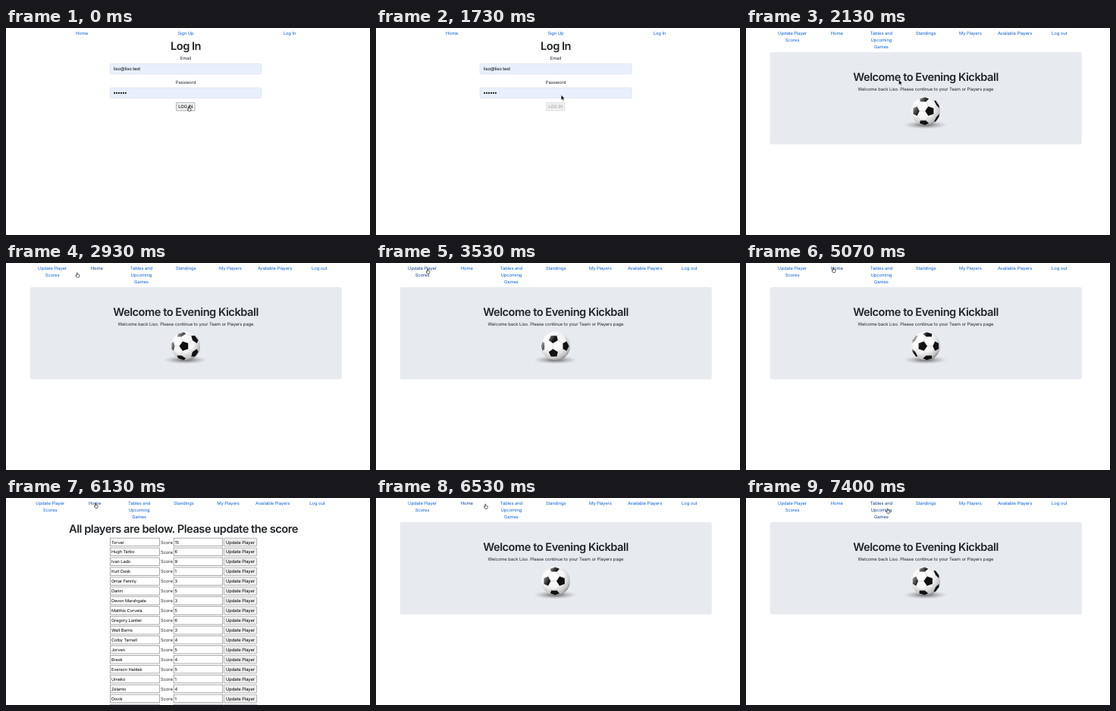
Recreate the animation shown at these times as an HTML page. Size 480 by 274 pixels, loop 7.47 s.

```html
<!DOCTYPE html>
<html lang="en">
<head>
<meta charset="utf-8">
<title>Log in and update scores</title>
<style>
  html, body { margin: 0; height: 100%; overflow: hidden; background: #fff; }
  svg { display: block; width: 100vw; height: 100vh; }
  text {
    font: 5.86px Inter, "Open Sans", sans-serif; letter-spacing: -.014em;
    fill: #212529; text-rendering: geometricPrecision;
  }
  .mid { text-anchor: middle; }
  .title { font-size: 14.65px; font-weight: 600; letter-spacing: -.032em; }
  .link { fill: #0b62da; }
  .link.hover { fill: #123f8c; }
  .value { font-size: 5.65px; fill: #000; }
  .field { fill: #e8f0fe; stroke: #ced4da; stroke-width: .5; }
  .input { fill: #fff; stroke: #858585; stroke-width: .7; }
  .button { fill: #efefef; stroke: #767676; stroke-width: .5; }
  .label { fill: #000; }
  .off .button { stroke: #cfcfcf; }
  .off .label { fill: #a3a3a3; }
</style>
</head>
<body>
<svg viewBox="0 0 480 274">
  <defs>
    <radialGradient id="skin" cx=".4" cy=".34" r=".72">
      <stop offset="0" stop-color="#fff"/>
      <stop offset=".55" stop-color="#f3f3f3"/>
      <stop offset=".82" stop-color="#c4c4c4"/>
      <stop offset="1" stop-color="#777"/>
    </radialGradient>
    <linearGradient id="gloss" x1=".05" y1=".2" x2=".5" y2=".5">
      <stop offset="0" stop-color="#fff" stop-opacity=".75"/>
      <stop offset=".7" stop-color="#fff" stop-opacity="0"/>
    </linearGradient>
    <radialGradient id="shade">
      <stop offset="0" stop-color="#222" stop-opacity=".75"/>
      <stop offset=".5" stop-color="#555" stop-opacity=".35"/>
      <stop offset="1" stop-color="#888" stop-opacity="0"/>
    </radialGradient>
  </defs>
  <g id="login"></g>
  <g id="nav"></g>
  <g id="home">
    <rect x="31.7" y="32" width="411" height="122" rx="2" fill="#e7eaef"/>
    <g id="welcome"></g>
    <ellipse cx="236.5" cy="128.3" rx="29" ry="5.5" fill="url(#shade)"/>
    <circle cx="237" cy="110" r="19" fill="url(#skin)"/>
    <path id="seams" fill="none" stroke="#d2d2d2" stroke-width=".4"/>
    <path id="patches" fill="#111"/>
    <circle cx="237" cy="110" r="19" fill="url(#gloss)"/>
  </g>
  <g id="players"></g>
  <g id="cursor">
    <path id="arrow" d="M0 0V6.6L1.5 5.2L2.5 7.5L3.6 7L2.6 4.8H4.7Z" fill="#000" stroke="#fff" stroke-width=".4"/>
    <path id="hand" transform="scale(.85)" d="M-.6 .5Q0 -.3 .6 .5V2.8Q1.2 2.3 1.7 2.9Q2.3 2.5 2.7 3.1Q3.5 2.9 3.5 3.8V5.2L2.8 7.4H-.5L-2.1 4.8Q-2.3 3.8 -1.4 4L-.6 4.8Z" fill="#fff" stroke="#000" stroke-width=".7" stroke-linejoin="round"/>
  </g>
</svg>
<script>
const LOOP = 7470, FRAMES = 112;
const HOME_AT = 30, PLAYERS_AT = 81, BACK_AT = 95;
const $ = id => document.getElementById(id);
const show = (id, on) => $(id).style.display = on ? "" : "none";

const text = (x, y, str, cls = "") => `<text x="${x}" y="${y}" class="${cls}">${str}</text>`;
const rect = (x, y, w, h, cls, r = 0) =>
  `<rect x="${x}" y="${y}" width="${w}" height="${h}" rx="${r}" class="${cls}"/>`;

function buildLogin() {
  const dots = Array.from({ length: 6 }, (_, i) =>
    `<circle cx="${143.1 + i * 2.95}" cy="86.1" r="1.05"/>`).join("");
  $("login").innerHTML =
    text(100, 9.2, "Home", "mid link") + text(237, 9.2, "Sign Up", "mid link") +
    text(374, 9.2, "Log In", "mid link") +
    text(237, 29, "Log In", "mid title") +
    text(237, 42, "Email", "mid") + rect(137.2, 47.2, 199.6, 13.7, "field", 1.5) +
    text(141.8, 56.2, "liso@liso.test", "label") +
    text(237, 73.7, "Password", "mid") + rect(137.2, 79.1, 199.6, 13.7, "field", 1.5) + dots +
    `<g id="submit">${rect(224.4, 98.7, 24.6, 10.8, "button", .6)}${text(236.8, 106.2, "LOG IN", "mid label")}</g>`;
}

const LINKS = ["Update Player|Scores", "Home", "Tables and|Upcoming|Games", "Standings",
  "My Players", "Available Players", "Log out"];
const COL = 58.7, LEFT = 31.7;

function buildNav() {
  $("nav").innerHTML = LINKS.map((label, i) => `<g>${label.split("|").map((line, j) =>
    text(LEFT + COL * (i + .5), 9.1 + j * 8.8, line, "mid link")).join("")}</g>`).join("");
}

const ROWS = [["Torvel", 15], ["Hugh Tarbo", 6], ["Ivan Lado", 9], ["Kurt Dask", 1],
  ["Omar Fennly", 3], ["Darim", 5], ["Devon Marshgate", 3], ["Matthis Corvela", 5],
  ["Gregory Lantier", 6], ["Walt Barns", 3], ["Colby Tarnell", 4], ["Jorven", 5],
  ["Brask", 4], ["Everson Haldek", 5], ["Umeko", 1], ["Zelanto", 4], ["Dovik", 1], ["", ""]];

function buildPlayers() {
  $("players").innerHTML =
    text(234, 46.4, "All players are below. Please update the score", "mid title") +
    ROWS.map(([name, score], i) => {
      const y = 53.1 + i * 12.94;
      return rect(137.4, y, 65, 10.6, "input") + text(138.9, y + 7.4, name, "value") +
        text(204, y + 7.5, "Score") +
        rect(221.2, y, 64.5, 10.6, "input") + text(222.6, y + 7.4, score, "value") +
        rect(287.4, y, 43.2, 10.6, "button", .6) + text(309, y + 7.4, "Update Player", "mid label");
    }).join("");
}

// Ball: the black patches sit on the corners of an icosahedron.
const PHI = (1 + Math.sqrt(5)) / 2, R = 19;
const corners = [];
for (const a of [-1, 1]) for (const b of [-PHI, PHI])
  corners.push([0, b, a], [a, 0, b], [b, a, 0]);
const dist = (p, q) => Math.hypot(...p.map((v, i) => v - q[i]));
const unit = p => p.map(v => v / Math.hypot(...p));
const third = (p, q) => unit(p.map((v, i) => (2 * v + q[i]) / 3));
const around = corners.map(p => corners.filter(q => Math.abs(dist(p, q) - 2) < .01));

// Orders the five patch points so that each one follows a neighbour.
const rings = corners.map((p, i) => {
  const rest = [...around[i]], ring = [rest.shift()];
  while (rest.length) {
    const last = ring[ring.length - 1];
    ring.push(...rest.splice(rest.findIndex(q => dist(q, last) < 2.01), 1));
  }
  return ring.map(q => third(p, q));
});

function drawBall(deg) {
  const t = deg * Math.PI / 180, c = Math.cos(t), s = Math.sin(t);
  const turn = ([x, y, z]) => [x * c + z * s, y, z * c - x * s];
  const place = ([x, y, z]) => {
    const k = z < 0 ? R / Math.hypot(x, y) : R;
    return `${(237 + x * k).toFixed(2)} ${(110 - y * k).toFixed(2)}`;
  };
  let patches = "", seams = "";
  corners.forEach((p, i) => {
    if (turn(unit(p))[2] > .2) patches += "M" + rings[i].map(turn).map(place).join("L") + "Z";
    for (const q of around[i]) {
      const a = turn(third(p, q)), b = turn(third(q, p));
      if (a[2] > 0 && b[2] > 0) seams += `M${place(a)}L${place(b)}`;
    }
  });
  $("patches").setAttribute("d", patches);
  $("seams").setAttribute("d", seams);
}

// Pointer stops: step, x, y
const PATH = [[0, 241, 103.7], [8, 241, 103.7], [15, 266, 94], [17, 266, 94], [18, 267, 82],
  [22, 267, 82], [26, 244.2, 88.7], [30, 222, 78], [38, 140, 40], [42, 104, 18], [44, 93.7, 12.8],
  [46, 75, 13], [49, 67.5, 7], [54, 68, 8], [58, 70.5, 13.5], [63, 70.5, 14], [67, 67, 7],
  [70, 71, 12], [76, 115, 6.2], [81, 118, 7], [91, 118, 7], [95, 118.6, 7.2], [103, 187, 9],
  [108, 187, 14], [111, 186.6, 14]];

function pointer(n) {
  const i = Math.max(1, PATH.findIndex(p => p[0] >= n));
  const [a, b] = [PATH[i - 1], PATH[i]], k = (n - a[0]) / (b[0] - a[0]);
  return [a[1] + (b[1] - a[1]) * k, a[2] + (b[2] - a[2]) * k];
}

function draw(n) {
  const login = n < HOME_AT, players = n >= PLAYERS_AT && n < BACK_AT;
  const home = !login && !players, shift = players ? -2.8 : 0;
  const [x, y] = pointer(n);
  const col = !login && y < 30 ? Math.floor((x - LEFT - shift) / COL) : -1;

  show("login", login);
  show("nav", !login);
  show("home", home);
  show("players", players);
  $("submit").classList.toggle("off", n > 0);
  $("nav").setAttribute("transform", `translate(${shift})`);
  [...$("nav").children].forEach((g, i) => {
    for (const line of g.children) line.classList.toggle("hover", i === col);
  });
  if (home) drawBall(n < PLAYERS_AT ? 28.7 + 13 * (n - 63) : 13 * (n - 111) - 19.7);

  const hand = n === 0 || col >= 0;
  show("hand", hand);
  show("arrow", !hand);
  $("cursor").setAttribute("transform", `translate(${x.toFixed(2)} ${y.toFixed(2)})`);
}

buildLogin();
buildNav();
buildPlayers();
$("welcome").innerHTML = text(237, 70, "Welcome to Evening Kickball", "mid title") +
  text(237, 83, "Welcome back Liso. Please continue to your Team or Players page", "mid");

const start = performance.now();
let shown = -1;
function tick() {
  const t = (performance.now() - start) % LOOP;
  const n = Math.floor((t + 8) * FRAMES / LOOP) % FRAMES;
  if (n !== shown) draw(shown = n);
  requestAnimationFrame(tick);
}
tick();
</script>
</body>
</html>
```
